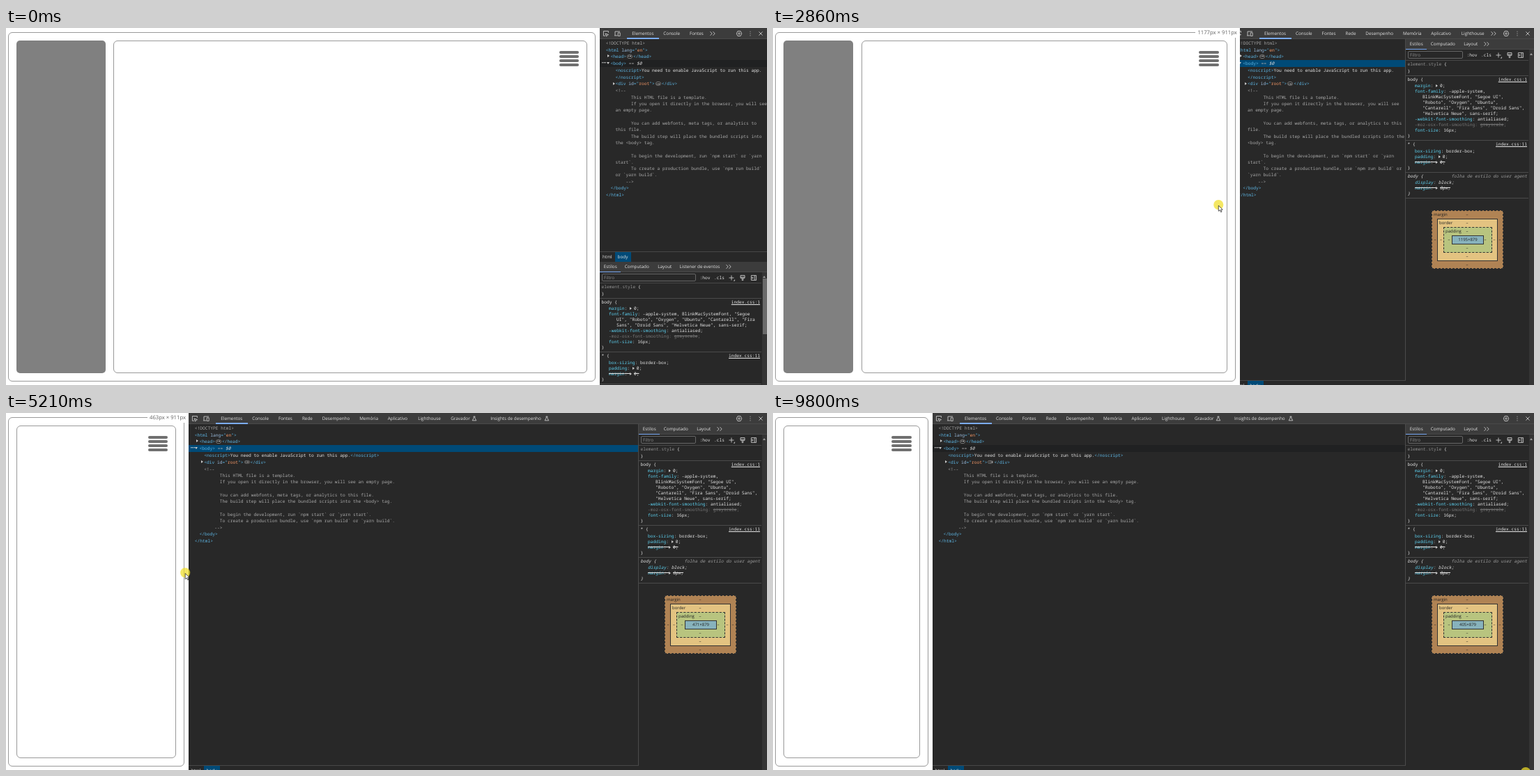
An HTML page for the animation above (9.92 s loop, 1092x513 px).

```html
<!DOCTYPE html>
<html lang="pt">
<head>
<meta charset="utf-8">
<style>
html, body { margin: 0; width: 100%; height: 100%; overflow: hidden; background: #fff; }
* { box-sizing: border-box; text-rendering: geometricPrecision; }
#stage { position: absolute; left: 0; top: 0; width: 1092px; height: 513px; overflow: hidden;
  background: #fff; font: 6.35px/10px "Open Sans", "Noto Sans", sans-serif; color: #e3e3e3; }
#stage div, .t, .i { position: absolute; }
.t { white-space: nowrap; }
.i { overflow: visible; fill: none; stroke: #c7c7c7; stroke-width: .9; }

#page { left: 0; top: 0; height: 513px; background: #fff; overflow: hidden; }
.frame { border: 1px solid #999; border-radius: 6px; }
#outer { left: 3px; top: 6px; height: 502px; }
#main { top: 17.5px; height: 478.5px; }
#side { left: 15px; top: 17.5px; height: 478px; background: #808080; border-radius: 5px; }
#burger { top: 33px; width: 28.5px; height: 22px; }
#burger div { left: 0; width: 100%; height: 4px; border-radius: 2px; background: #707070; }
#label { right: 0; top: 0; height: 14px; padding: 0 4px 0 3px; background: #fff; color: #606060;
  font-size: 7.7px; line-height: 15px; white-space: nowrap; }

#panel { top: 0; right: 0; height: 513px; background: #282828; overflow: hidden; }
.bar { left: 0; right: 0; background: #3c3c3c; border-bottom: 1px solid #4a4a4a; }
.line { background: #7cacf8; height: 1.5px; }
#tree { left: 0; top: 16px; overflow: hidden; background: #282828; }
#stage .r { position: relative; white-space: pre-wrap; line-height: 9.6px; }
.mono { font: 6.26px/9.32px "Noto Sans Mono", "DejaVu Sans Mono", monospace; }
.tag { color: #5db5e3; } .at { color: #9bbbdc; } .va { color: #f29766; } .g { color: #a8a8a8; }
.dots { display: inline-block; width: 8px; height: 5.4px; margin: 0 1px; border: 1px solid #777;
  border-radius: 3px; vertical-align: -.3px; position: relative; }
.dots::after { content: ""; position: absolute; left: 1.1px; top: 1.2px; width: 4px; height: 1px;
  background: repeating-linear-gradient(90deg, #ddd 0 1px, transparent 1px 1.6px); }
.tri { position: absolute; width: 0; height: 0; border: solid transparent; border-width: 2px 0 2px 3.2px;
  border-left-color: #c7c7c7; }
.tri.open { border-width: 3.4px 2.3px 0; border-top-color: #c7c7c7; border-left-color: transparent; }
#crumb { left: 0; height: 15px; border-top: 1px solid #474747; background: #282828; overflow: hidden; }
#styles { right: 0; bottom: 0; background: #282828; overflow: hidden; }
#input { left: 3px; right: 102px; top: 17px; height: 11px; border: 1px solid #666; border-radius: 2px;
  color: #8f8f8f; padding-left: 2px; line-height: 9.5px; }
#rules { left: 0; right: 8px; top: 30px; border-top: 1px solid #474747; }
#stage .sec { position: relative; padding: 0 0 2px 2.6px; border-bottom: 1px solid #4a4a4a; }
#stage .hd { position: relative; height: 10.5px; line-height: 10px; white-space: pre; }
#stage .p { position: relative; line-height: 8px; padding-left: 21.4px; text-indent: -11px; }
#stage .e { position: relative; line-height: 8px; }
.p b { font-weight: 400; color: #5ccfee; }
.p i { display: inline-block; width: 6px; height: 4px; position: relative; }
.p i::after { content: ""; position: absolute; left: 0; top: 0; border: solid transparent;
  border-width: 2px 0 2px 3.4px; border-left-color: #c7c7c7; }
.link { position: absolute; right: 2px; text-decoration: underline; }
.ua { position: absolute; right: 2px; color: #9a9a9a; }
s { text-decoration-thickness: .8px; }
#box { right: 0; top: 0; width: 184px; height: 513px; color: #222; font-size: 6px; }
#scroll { right: 0; width: 7px; top: 15px; bottom: 0; background: #353535; }
#cursor { left: 0; top: 0; width: 0; height: 0; }
#halo { left: -6.7px; top: -6.7px; width: 13.4px; height: 13.4px; border-radius: 50%; background: rgba(240,222,40,.72); }
</style>
</head>
<body>
<div id="stage">
  <div id="panel">
    <div class="bar" id="top" style="top:0;height:16px"></div>
    <div id="tree" class="mono"></div>
    <div id="crumb">
      <div id="cur" style="left:22px;width:23px;top:0;height:14px;background:#004a77"></div>
      <span class="t" style="left:4px;top:1.5px">html</span><span class="t" style="left:25.6px;top:1.5px">body</span>
    </div>
    <div id="styles">
      <div class="bar" id="sub" style="top:0;height:15px"></div>
      <div id="input">Filtro</div>
      <span class="t mono" style="right:81.5px;top:18px">:hov</span>
      <span class="t mono" style="right:61px;top:18px">.cls</span>
      <div id="rules" class="mono"></div>
      <div id="scroll">
        <div class="tri" style="left:1px;top:5px;border-width:0 2.5px 3.5px;border-color:transparent transparent #999"></div>
        <div id="thumb" style="left:1px;width:6px;top:9px;height:80px;background:#6b6b6b"></div>
      </div>
    </div>
    <div id="box"></div>
  </div>
  <div id="page">
    <div id="outer" class="frame"></div>
    <div id="main" class="frame"></div>
    <div id="side"></div>
    <div id="burger"></div>
    <div id="label"></div>
  </div>
  <div id="cursor">
    <div id="halo"></div>
    <svg id="arrow" class="i" style="left:0;top:1px" width="8" height="11"><path d="M0 0V8.2L2 6.6 3.4 9.6 4.7 9 3.4 6.1H6Z" fill="#fff" stroke="#111" stroke-width=".7"/></svg>
    <svg id="resize" class="i" style="left:0;top:0" width="8" height="8"><path d="M-5 0L-2.2-2.2V-.7H2.2V-2.2L5 0 2.2 2.2V.7H-2.2V2.2Z" fill="#fff" stroke="#222" stroke-width=".6"/></svg>
  </div>
</div>
<script>
const LOOP = 9920, $ = id => document.getElementById(id);
const px = v => v + 'px';
const add = (id, html) => $(id).insertAdjacentHTML('beforeend', html);
const text = (x, y, s, more = '') => `<span class="t" style="left:${x}px;top:${y - 5}px" ${more}>${s}</span>`;
const icon = (side, x, y, d, more = '') =>
  `<svg class="i" width="1" height="1" style="${side}:${x}px;top:${y}px" ${more}><path d="${d}"/></svg>`;
const MORE = 'M-3.5-2.8L-.8 0-3.5 2.8M.5-2.8L3.2 0 .5 2.8';
const FLASK = 'M-1.2-3H1.2M-.8-3V-.8L-2.8 2.8H2.8L.8-.8V-3';

// Toolbar: label, left edge, right edge
const topTabs = [['Elementos', 46.3, 77], ['Console', 91.3, 116], ['Fontes', 129, 150.3], ['Rede', 163, 178.7],
  ['Desempenho', 191.7, 232.2], ['Memória', 245.3, 272.5], ['Aplicativo', 285.7, 316], ['Lighthouse', 329.2, 363.5],
  ['Gravador', 376.2, 415], ['Insights de desempenho', 433.2, 518]];
const subTabs = [['Estilos', 5.8, 24], ['Computado', 35.8, 72], ['Layout', 83.3, 104],
  ['Listener de eventos', 114.6, 173.5], ['Pontos de interrupção DOM', 185, 270]];
add('top', topTabs.map(([s, x]) => text(x, 7.5, s)).join('')
  + icon('left', 9, 7.5, 'M-1-.1L3.5 1.6 1.4 2.3 .7 4.2ZM3.4-1.2V-3.5H-3.6V3.2H-1')
  + icon('left', 25, 7.5, 'M-3 2.8V-3H4M-4 2.9H.5M1.2-1.2H4.2V3.4H1.2Z')
  + icon('left', 410, 7.5, FLASK, 'data-i="8"') + icon('left', 514, 7.5, FLASK, 'data-i="9"')
  + icon('left', 0, 7.5, MORE, 'data-more')
  + icon('right', 39, 7.5, 'M-3.8 0L-2-3.5H2L3.8 0 2 3.5H-2ZM-1.3 0A1.3 1.3 0 1 0 1.3 0 1.3 1.3 0 1 0-1.3 0')
  + icon('right', 23, 7.5, 'M-.5-2.8H.5M-.5 0H.5M-.5 2.8H.5', 'stroke-width="1.3"')
  + icon('right', 8, 7.5, 'M-2.6-2.6L2.6 2.6M2.6-2.6L-2.6 2.6')
  + '<div class="line" style="left:39px;width:46px;top:14px"></div>');
add('sub', subTabs.map(([s, x]) => text(x, 7.2, s)).join('') + icon('left', 0, 7.2, MORE, 'data-more')
  + '<div class="line" style="left:0;width:30px;top:13.5px"></div>');
add('styles', icon('right', 50, 22.5, 'M-3.5 0H3.5M0-3.5V3.5M3 4.2H4.6V2.6')
  + icon('right', 34, 22.5, 'M-3-3.5H3V.3H-3ZM-3-1H3M-.8 .5V3.6H.8V.5')
  + icon('right', 18, 22.5, 'M-3.6-3.4H3.6V3.4H-3.6ZM1.4-3.4V3.4M-.2 0H-2.5M-1.2-1.4L-2.6 0-1.2 1.4'));

// Element tree
const tag = s => `<span class="tag">&lt;${s}&gt;</span>`;
const attr = (el, n, v) => `<span class="tag">&lt;${el} <span class="at">${n}</span>="<span class="va">${v}</span>"&gt;</span>`;
const row = (pad, h, html, more = '') => `<div class="r" ${more} style="padding-left:${pad}px;line-height:${h}px">${html}</div>`;
const fold = (x, open = '') => `<span class="tri ${open}" style="left:${x}px;top:${open ? 3.1 : 2.2}px"></span>`;
const gap = '<span class="dots"></span>';
const note = `<!--
      This HTML file is a template.
      If you open it directly in the browser, you will see an empty page.

      You can add webfonts, meta tags, or analytics to this file.
      The build step will place the bundled scripts into the <body> tag.

      To begin the development, run \`npm start\` or \`yarn start\`.
      To create a production bundle, use \`npm run build\` or \`yarn build\`.
    -->`.replace(/</g, '&lt;');
add('tree', '<div style="position:relative;height:1px"></div>'
  + row(8.7, 9.6, '<span class="g">&lt;!DOCTYPE html&gt;</span>')
  + row(8.7, 9.7, attr('html', 'lang', 'en'))
  + row(15.6, 10, fold(11) + tag('head') + gap + tag('/head'))
  + row(15.6, 9.7, '<span class="t" style="left:2px;top:-1px;letter-spacing:-1.6px">•••</span>' + fold(9.5, 'open')
    + tag('body') + '<span class="g"> == <em style="color:#ddd">$0</em></span>', 'id="sel"')
  + row(22.4, 9.7, tag('noscript') + 'You need to enable JavaScript to run this app.<wbr>' + tag('/noscript'))
  + row(22.4, 10, fold(18.5) + attr('div', 'id', 'root') + gap + tag('/div'))
  + row(22.4, 9.32, `<span class="g">${note}</span>`)
  + row(15.6, 9.9, tag('/body')) + row(8.7, 9.5, tag('/html')));

// Style rules
const prop = (n, v) => `<div class="p"><b>${n}</b>: ${v};</div>`;
const cut = v => `<div class="p"><s><b>margin</b>: <i></i>${v};</s></div>`;
const rule = (head, right, body, more = '') =>
  `<div class="sec" ${more}><div class="hd">${head} {${right}</div>${body}<div class="e">}</div></div>`;
const link = n => `<span class="link">index.css:${n}</span>`;
const fonts = '-apple-system, BlinkMacSystemFont, "Segoe UI", "Roboto", "Oxygen", "Ubuntu", "Cantarell", "Fira Sans", "Droid Sans", "Helvetica Neue", sans-serif';
add('rules', rule('<span style="color:#8f8f8f">element.style</span>', '', '')
  + rule('body', link(1), prop('margin', '<i></i>0') + prop('font-family', fonts)
    + prop('-webkit-font-smoothing', 'antialiased')
    + '<div class="p" style="color:#777"><span>-moz-osx-font-smoothing: <s>grayscale</s>;</span></div>'
    + prop('font-size', '16px'))
  + rule('*', link(11), prop('box-sizing', 'border-box') + prop('padding', '<i></i>0') + cut('0'))
  + rule('body', '<span class="ua">folha de estilo do user agent</span>', prop('display', 'block') + cut('8px'), 'style="font-style:italic"'));

// Box model
const layers = [[37, 262, 103, 84, '#b08354', 'dashed'], [45, 274, 86.5, 60.5, '#e3c381', 'solid'],
  [54, 286, 69.5, 36.5, '#b8c47f', 'dashed'], [66, 297.5, 46, 13, '#87b2bc', 'solid']];
add('box', layers.map(([x, y, w, h, c, b]) =>
  `<div style="left:${x}px;top:${y}px;width:${w}px;height:${h}px;background:${c};border:1px ${b} #333"></div>`).join('')
  + text(40, 268, 'margin') + text(48, 280, 'border') + text(57, 292, 'padding')
  + [268, 280, 292, 316, 328, 340].map(y => text(86.5, y, '–')).join('')
  + [40.5, 49, 60.5, 112.5, 125.5, 133.5].map(x => text(x, 304, '–')).join('')
  + '<div id="size" style="left:66px;width:46px;top:299px;text-align:center"></div>');
add('burger', [0, 6, 12, 18].map(y => `<div style="top:${y}px"></div>`).join(''));

// Motion: time, value(s)
const edgeKeys = [[1460, 852], [1700, 850], [1870, 838], [2080, 792], [2450, 712], [2680, 699], [2940, 641], [2980, 632],
  [3160, 632], [3500, 560], [4140, 366], [4360, 343], [4450, 340], [5160, 262], [5210, 262], [5900, 234],
  [6150, 230.6], [6240, 230.6], [6330, 228.8]];
const dragY = [[640, 258], [1460, 258], [2080, 252], [2860, 254], [4360, 235], [6200, 223]];
const goIn = [[40, 1076, 502], [300, 905, 370], [450, 806, 290], [640, 852, 258]];
const goOut = [[6240, 228, 223], [6600, 169, 90], [6840, 177, 40], [9050, 177, 40], [9400, 560, 250], [9780, 1080, 516]];
const smooth = u => u * u * (3 - 2 * u);
const clamp = u => Math.max(0, Math.min(1, u));
function at(keys, t, n = 1) {
  let i = 1;
  while (i < keys.length - 1 && t > keys[i][0]) i++;
  const a = keys[i - 1], b = keys[i], u = clamp((t - a[0]) / (b[0] - a[0]));
  return a[n] + (b[n] - a[n]) * u;
}
const edge = t => at(edgeKeys, t);
const pixels = w => Math.round(1.752 * w + 4);

function fitTabs(id, tabs, left, limit) {
  const bar = $(id), spans = bar.querySelectorAll('.t'), more = bar.querySelector('[data-more]');
  let n = 0;
  while (n < tabs.length && left + tabs[n][2] <= limit) n++;
  spans.forEach((s, i) => s.style.display = i < n ? '' : 'none');
  bar.querySelectorAll('[data-i]').forEach(s => s.style.display = s.dataset.i < n ? '' : 'none');
  more.style.display = n < tabs.length ? '' : 'none';
  more.style.left = px(tabs[Math.max(0, n - 1)][2] + 11.5);
}

function drawPage(t, w) {
  const small = w < 340.3;
  const open = smooth(clamp((t - 7250) / 390)) - smooth(clamp((t - 8930) / 390));
  const sw = small ? 0.594 * (w - 33) : Math.max(.15 * w, 85.4);
  const mx = small ? 15 : 26.4 + sw;
  $('page').style.width = px(w);
  $('page').style.zIndex = t > 2500 ? 1 : 0;
  $('panel').style.zIndex = t > 2500 ? 0 : 1;
  $('outer').style.width = px(w - 9);
  $('main').style.left = px(mx);
  $('main').style.width = px(w - 18 - mx);
  $('side').style.width = px(sw);
  $('side').style.transform = small ? `translateX(${(open - 1) * (sw + 16)}px)` : 'none';
  $('burger').style.left = px(w - 58.5);
  $('label').style.display = t >= 1460 && t < 6840 ? '' : 'none';
  $('label').textContent = pixels(w) + 'px × 911px';
}

function drawPanel(t, p) {
  const wide = p < 690, w = 1092 - p, tw = wide ? w - 184 : w;
  $('panel').style.left = px(p);
  $('tree').style.width = px(tw);
  $('tree').style.height = px(wide ? 491 : 305);
  $('tree').style.borderRight = wide ? '1px solid #4a4a4a' : 'none';
  $('crumb').style.width = px(tw);
  $('crumb').style.top = px(wide ? 506 : 321);
  $('styles').style.width = px(wide ? 184 : w);
  $('styles').style.top = px(wide ? 16 : 336);
  $('thumb').style.display = wide ? 'none' : '';
  $('box').style.display = wide ? '' : 'none';
  $('size').textContent = pixels(edge(t - 95)) + '×879';
  $('sel').style.background = t >= 1460 && t < 6400 ? '#004a77' : '#202122';
  fitTabs('top', topTabs, p, 1023.3);
  fitTabs('sub', subTabs, wide ? 908 : p, wide ? 1030 : 1066);
}

function drawCursor(t) {
  const path = t < 640 ? goIn : goOut, drag = t >= 640 && t < 6240;
  const x = drag ? edge(t + 80) - (t > 1460 ? 1.5 : 0) : at(path, t);
  const y = drag ? at(dragY, t) : at(path, t, 2);
  const still = drag && Math.abs(edge(t + 80) - edge(t)) < 2;
  const press = [[820, 340], [7070, 60], [8800, 120]].reduce((m, [s, d]) =>
    t > s && t < s + d ? Math.sin(Math.PI * (t - s) / d) : m, 0);
  $('cursor').style.display = t < 40 ? 'none' : '';
  $('cursor').style.zIndex = 2;
  $('cursor').style.transform = `translate(${x}px,${y}px)`;
  $('halo').style.transform = `scale(${1 - .2 * press})`;
  $('arrow').style.display = still ? 'none' : '';
  $('resize').style.display = still ? '' : 'none';
}

const start = performance.now();
function frame() {
  const t = (performance.now() - start) % LOOP;
  drawPage(t, edge(t - 50));
  drawPanel(t, edge(t));
  drawCursor(t);
  requestAnimationFrame(frame);
}
frame();
</script>
</body>
</html>
```
